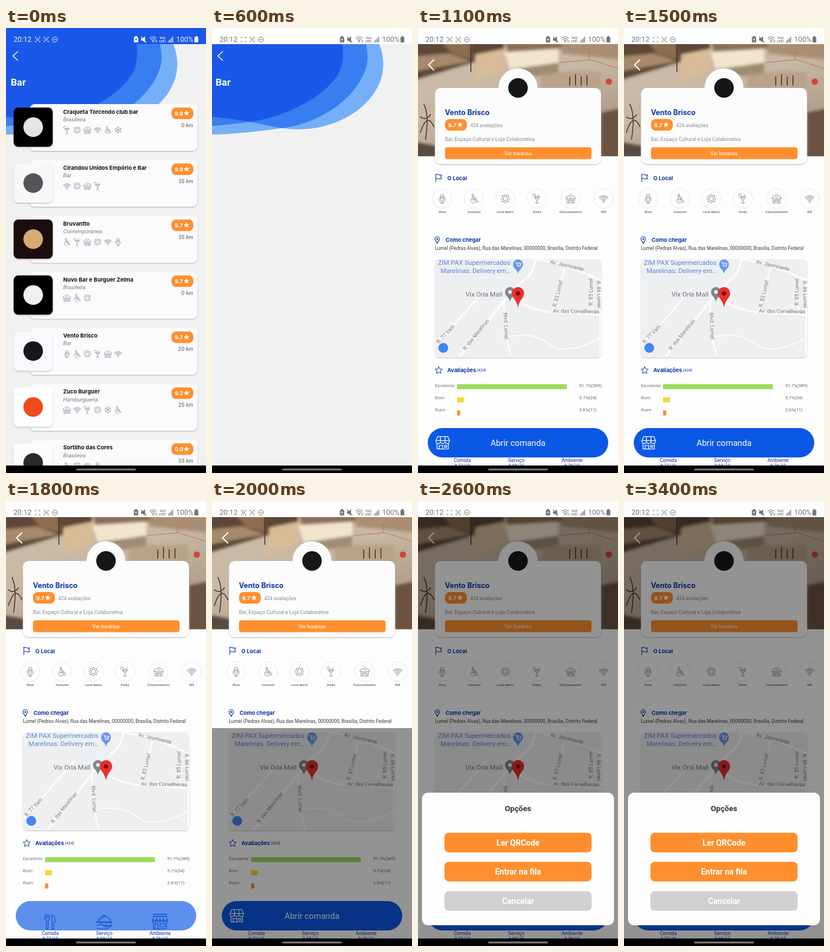
These frames come from a looping animation (348 by 772 pixels, 3500 ms). An HTML page:

```html
<!DOCTYPE html>
<html lang="pt">
<head>
<meta charset="utf-8">
<title>Bar</title>
<style>
html, body { margin: 0; width: 100%; height: 100%; overflow: hidden; background: #000; }
svg { display: block; width: 100vw; height: 100vh; }
text { font-family: Roboto, sans-serif; white-space: pre; }
.in { font-family: Inter, sans-serif; }
.b { font-weight: 700; }
.i { font-style: italic; }
</style>
</head>
<body>
<svg id="stage" viewBox="0 0 348 772"></svg>
<script>
const ORANGE = '#ff8f2e', BLUE = '#0b57e6', NAVY = '#0a33a8';
const LOOP = 3500, STEP = 100;

// Line icons on a 16 x 16 grid, centred on 0,0
const ICONS = {
  drink: 'M-5 -3H5L0 3ZM0 3V7M-3 7H3M1 -3L4 -7M-7 -4a2.6 2.6 0 1 1 4 1M-3 -1H3',
  sun: 'M-3.6 0a3.6 3.6 0 1 0 7.2 0a3.6 3.6 0 1 0 -7.2 0M-2 -5L0 -7.5L2 -5L5.3 -5.3L5 -2L7.5 0L5 2L5.3 5.3L2 5L0 7.5L-2 5L-5.3 5.3L-5 2L-7.5 0L-5 -2L-5.3 -5.3Z',
  house: 'M-7.5 -2L0 -7L7.5 -2V0H-7.5ZM-6 0V7H6V0M-3.5 7V2H3.5V7M-3.5 4H3.5M-2 -3H2',
  wifi: 'M-7.5 -2Q0 -8 7.5 -2L6 -.5Q0 -5.5 -6 -.5ZM-4.5 1Q0 -3 4.5 1L3 2.5Q0 0 -3 2.5ZM-1.3 4.5a1.3 1.3 0 1 0 2.6 0a1.3 1.3 0 1 0 -2.6 0',
  chair: 'M-3.5 -6a1.5 1.5 0 1 0 3 0a1.5 1.5 0 1 0 -3 0M-3 -3.5H0V1H4L6 6L7 5.5M-3 -3.5V2H2L4 7M0 -1H4M-4 0a4 4 0 1 0 6 5',
  snow: 'M0 -7V7M-6 -3.5L6 3.5M-6 3.5L6 -3.5M-2 -6.5L0 -4.5L2 -6.5M-2 6.5L0 4.5L2 6.5M-6.5 -1L-4 -2.3L-4.3 -5M6.5 -1L4 -2.3L4.3 -5M-6.5 1L-4 2.3L-4.3 5M6.5 1L4 2.3L4.3 5',
  mic: 'M-3 -4a3 3 0 0 1 6 0V0a3 3 0 0 1 -6 0ZM-3 -3H3M-3 -1H3M-5 -1V1a5 5 0 0 0 10 0V-1M0 6V7.5M-3 7.5H3',
  stall: 'M-5.5 -7H5.5L7.5 -2.5H-7.5ZM-7.5 -2.5V-1.5a2.5 2.3 0 0 0 5 0a2.5 2.3 0 0 0 5 0a2.5 2.3 0 0 0 5 0V-2.5M-2.5 -7V-1.5M2.5 -7V-1.5M-6.3 1V7H6.3V1M-4 7V3H0V7M2 3H4.5V5H2Z',
  shop: 'M-6.5 -7.5H6.5V-5.5H-6.5ZM-6 -5.5H6L7.5 -1.5H-7.5ZM-7.5 -1.5V0H7.5V-1.5M-3 -5.5L-3.7 0M0 -5.5V0M3 -5.5L3.7 0M-6.5 0V7H6.5V0M-5 7V2H-2V7M0 2H5V5H0Z',
  cutlery: 'M-5.2 -7.5V-3.5Q-5.2 -1.5 -3.8 -1V7.2H-2.2V-1Q-.8 -1.5 -.8 -3.5V-7.5M-3.7 -7.5V-3.5M-2.3 -7.5V-3.5M1.8 7.2V-7Q5 -6 5 0H3.6V7.2Z',
  cloche: 'M-7.5 0H7.5V1H-7.5ZM-6 0a6 5.5 0 0 1 12 0M-1 -5.5a1 1 0 1 1 2 0M-4 -1a4 3.5 0 0 1 3 -3M-7.5 4L-4 2.5L0 3.5H3L2 5H-1M2 5L6.5 3L7.5 4L2 7H-3L-7.5 6.5'
};

const fmt = o => Object.entries(o || {}).map(([k, v]) => ` ${k}="${v}"`).join('');
const rect = (x, y, w, h, fill, rx = 0, o) =>
  `<rect x="${x}" y="${y}" width="${w}" height="${h}" rx="${rx}" fill="${fill}"${fmt(o)}/>`;
const circle = (x, y, r, fill, o) => `<circle cx="${x}" cy="${y}" r="${r}" fill="${fill}"${fmt(o)}/>`;
const shape = (d, fill, o) => `<path d="${d}" fill="${fill}"${fmt(o)}/>`;
const line = (d, color, w = 1, o) =>
  shape(d, 'none', { stroke: color, 'stroke-width': w, 'stroke-linejoin': 'round', ...o });
const text = (s, x, y, size, fill, cls = '', anchor = 'start', o) =>
  `<text x="${x}" y="${y}" font-size="${size}" fill="${fill}" class="${cls}" text-anchor="${anchor}"${fmt(o)}>${s}</text>`;
const icon = (name, x, y, size, color, w = .7) =>
  line(ICONS[name], color, w * 16 / size, { transform: `translate(${x} ${y}) scale(${size / 16})` });
const group = (body, o) => `<g${fmt(o)}>${body}</g>`;

function starPath(x, y, r) {
  const pts = Array.from({ length: 10 }, (_, k) => {
    const a = (k / 5 - .5) * Math.PI, q = k % 2 ? r * .48 : r;
    return (x + q * Math.cos(a)).toFixed(2) + ' ' + (y + q * Math.sin(a)).toFixed(2);
  });
  return 'M' + pts.join('L') + 'Z';
}

const badge = (x, y, value) => rect(x, y, 38, 20, ORANGE, 8) +
  text(value, x + 5.5, y + 13.6, 9.4, '#fff', 'in b') + shape(starPath(x + 26, y + 9.8, 5), '#fff');

const backArrow = x => line(`M${x + 9} 40.5L${x} 48.5L${x + 9} 56.5`, '#fff', 1.6);

function statusBar() {
  const c = 'currentColor';
  const frame = x => line(`M${x - 4} 18V16H${x - 2}M${x + 2} 16H${x + 4}V18M${x + 4} 22V24H${x + 2}M${x - 2} 24H${x - 4}V22`, c, .9);
  let s = text('20:12', 13, 24, 12.6, c) + frame(55) + frame(70) +
    circle(55, 20, 1.9, 'none', { id: 'blink', stroke: c }) +
    circle(70, 20, 1.9, 'none', { stroke: c }) +
    circle(85, 20, 4.3, 'none', { stroke: c }) + line('M82.5 20H87.5', c);
  s += rect(222.5, 15.5, 7.5, 9.5, c, 1.5) + rect(224.5, 14, 3.5, 2, c) +
    line('M224.5 19.5H228M226.2 18V22.5', 'var(--bar)', .9);
  s += shape('M235 18H237.5L242 14.5V25L237.5 22H235Z', c) + line('M235 15L244 25', c, 1.2);
  s += line('M250 17.5Q256 12.5 262 17.5M252 20Q256 16.5 260 20M254 22.3Q256 20.6 258 22.3', c, 1.2) +
    circle(256, 24, 1, c) + line('M260.5 21V25M262.5 25V21', c, .8);
  s += text('Vo))', 267.5, 18.8, 5.4, c, 'b') + text('LTE1', 266.5, 24.6, 5.4, c, 'b');
  for (let k = 0; k < 4; k++) s += rect(282 + k * 2.4, 22.5 - k * 2.4, 1.4, 2.5 + k * 2.4, c);
  return s + text('100%', 296, 24, 12.4, c) + rect(328, 15.5, 6.5, 9.5, c, 1.2) + rect(329.8, 14, 3, 2, c);
}

const BLOB_A = 'M0 28H291Q301 52 297 76C288 132 220 180 140 175.5Q125 174.5 110 172Q55 159 0 154Z';
const BLOB_B = 'M0 28H268Q273 50 269 66C254 120 190 166 120 174Q60 183 0 185Z';
const BLOB_C = 'M0 28H227Q230 52 225 67C212 112 130 156 63 163Q30 168 0 170Z';

function backdrop() {
  const inA = { 'clip-path': 'url(#inA)' };
  return rect(0, 28, 348, 732, '#f1f1f1') + shape(BLOB_A, '#74aff8') + shape(BLOB_B, '#74aff8') +
    shape(BLOB_B, '#387ef0', inA) + shape(BLOB_C, '#387ef0') + shape(BLOB_C, '#1a58e9', inA);
}

// name, kind, rating, km, icons, tile colour, mark colour
const PLACES = [
  ['Craqueta Torcendo club bar', 'Brasileira', '9.8', 0, 'drink sun house wifi chair snow', '#050505', '#e4e4e4'],
  ['Cirandou Unidos Empório e Bar', 'Bar', '9.8', 35, 'wifi sun house drink', '#f8f8f8', '#55555a'],
  ['Bruvantto', 'Contemporânea', '9.7', 35, 'chair drink house sun wifi mic', '#1d0f08', '#d7aa72'],
  ['Nuvo Bar e Burguer Zelma', 'Brasileira', '9.7', 0, 'house chair sun', '#050505', '#f0f0f0'],
  ['Vento Brisco', 'Bar', '9.7', 20, 'mic chair sun drink house wifi', '#f8f9fc', '#17171a'],
  ['Zuco Burguer', 'Hamburgueria', '9.2', 25, 'house wifi drink sun snow chair', '#ffffff', '#ee4a1c'],
  ['Sortilho das Cores', 'Brasileira', '0.0', 33, 'chair sun wifi mic', '#fcfcfc', '#2a2a2a']
];

const placeCard = ([name, kind, rating, km, icons, tile, mark], n) => group(
  rect(41, 132, 292, 81, '#fbfafd', 9, { filter: 'url(#soft)' }) +
  rect(13.3, 138, 68, 68, tile, 8, { filter: 'url(#soft)' }) + circle(47.3, 172, 17, mark) +
  text(name, 99.5, 148.8, 9.6, '#111', 'in b') + text(kind, 99.5, 162, 9.8, '#7c7c80', 'i') +
  icons.split(' ').map((k, j) => icon(k, 106 + j * 17.8, 177, 13.5, '#85858a')).join('') +
  badge(288, 138, rating) + text(km + ' km', 326, 171.5, 9, '#55555a', 'in', 'end'),
  { transform: `translate(0 ${n * 97.1})` });

function photo() {
  const blurred = rect(-10, 18, 368, 214, 'url(#wall)') +
    shape('M-10 18H150V66L96 60L-10 92Z', '#5d4737') + shape('M36 18H92V54L60 46Z', '#8d6c50') +
    shape('M-10 50L52 44L92 58L-10 76Z', '#a78a6c') + shape('M100 46L150 36V74L96 92Z', '#d8bc98') +
    shape('M150 18H250V36L156 42Z', '#8c7057') + shape('M150 42L244 36V60L160 72Z', '#f2e4cf') +
    shape('M160 72L244 60V78L206 84Z', '#a08b75') + shape('M250 18H358V56L250 44Z', '#a98e73') +
    shape('M250 76H318V104H214V84Z', '#b9a288') + shape('M318 146L358 138V232H318Z', '#6b5240') +
    shape('M-10 196L32 204V232H-10Z', '#574b40');
  return group(blurred, { filter: 'url(#blur)' }) +
    line('M92 28V76', '#44352a', 1.6) + line('M246 60L300 55L348 70M298 55V40', '#c06a52', .9) +
    line('M264 84V100M274 80V100M284 84V100M294 82V100', '#5d4a3b', 2) +
    line('M4 182Q16 144 28 172M10 132Q20 150 13 194M4 154Q14 162 22 150', '#4a4038', 1.7) +
    circle(332, 93, 5.5, '#d9433a');
}

function mapView() {
  const road = (d, w) => line(d, '#fcfcfd', w);
  const street = (s, x, y, a, size = 9) =>
    text(s, x, y, size, '#74787c', '', 'middle', { transform: `rotate(${a} ${x} ${y})`, dy: 3 });
  const pin = (x, y, r, tip, c) =>
    shape(`M${x - r} ${y}a${r} ${r} 0 0 1 ${2 * r} 0C${x + r} ${y + r * .85} ${x + r * .2} ${y + r} ${x} ${tip}C${x - r * .2} ${y + r} ${x - r} ${y + r * .85} ${x - r} ${y}Z`, c);
  let s = rect(29, 401, 290, 170, '#eeeff1') +
    road('M72 571L150 473Q166 452 184 438T204 401', 4) + road('M29 552L76 500L118 452', 3) +
    road('M150 474Q148 522 162 571', 3) + road('M174 474Q206 492 236 493T318 498', 3.5) +
    road('M204 401Q260 410 318 438', 3) + road('M256 412Q247 450 235 491', 3) +
    road('M303 430V496M317 436V571', 2.5) + road('M156 536Q200 526 228 548T318 538', 2);
  s += street('Av. Jasmirante', 259, 412, 13) + street('R. 83 Lumel', 243, 461, -76) +
    street('R. 85 Lumel', 301, 458, -90) + street('R. 86 Lumel', 315, 462, 88) +
    street('Av. das Corvelheiras', 275, 491.5, 1) + street('Blvd. Lumel', 153, 517, 87) +
    street('R. das Marelinas', 101, 532, -51) + street('R. 77 Vam', 48, 531, -47);
  s += text('ZIM PAX Supermercados', 161, 411, 11.4, '#5b84dc', '', 'end') +
    text('Marelinas: Delivery em…', 161, 424.5, 11.4, '#5b84dc', '', 'end') +
    text('Vix Orla Mall', 147, 466, 11.5, '#6d7378', '', 'end');
  s += pin(174, 410, 8.5, 426, '#6896ea') +
    line('M169.5 406.5H171.5L173 412H178L179 408H172', '#fff', 1.2) + circle(173.5, 414, .9, '#fff') + circle(177.5, 414, .9, '#fff');
  s += pin(160, 458, 8.5, 475, '#7b8890') + circle(160, 458, 3.2, '#eeeff1') +
    pin(174, 460, 10.6, 485.5, '#ea2f2f') + circle(174, 460.5, 3.8, '#7d1010') + circle(44, 555, 8.5, '#4285f4');
  return rect(29.5, 402, 289, 169, '#fff', 7, { filter: 'url(#soft)' }) + group(s, { 'clip-path': 'url(#mapBox)' });
}

function detail() {
  const head = (s, x, y) => text(s, x, y, 9.4, NAVY, 'in b');
  let s = rect(0, 28, 348, 732, '#fdfdfd') + group(photo(), { 'clip-path': 'url(#hero)' }) +
    line('M28 54.5L18.5 64L28 73.5', '#fff', 2) +
    rect(29.5, 104, 289, 132, '#fcfcfd', 10, { filter: 'url(#soft)' }) +
    circle(174, 104, 34, '#fcfcfd') + circle(174, 104, 17, '#17171a') +
    text('Vento Brisco', 46.8, 150.6, 12.5, NAVY, 'in b') + badge(47, 158, '9.7') +
    text('424 avaliações', 91, 171.6, 8.4, '#8b8b8f') +
    text('Bar, Espaço Cultural e Loja Colaborativa', 46.8, 196.2, 8.9, '#8b8b8f') +
    rect(47, 207, 255, 20.5, ORANGE, 4) + text('Ver horários', 174, 220.5, 8.8, '#fff', '', 'middle');
  s += line('M31 253V267M31 254.5Q34 253 36 254.5T41 254.5L39.5 258L41 261.5Q38 262.5 36 261.5T31 261.5', NAVY, 1.1) +
    head('O Local', 51, 263.6);
  [[42, 'mic', 'Show'], [97.5, 'chair', 'Acessível'], [152, 'sun', 'Local aberto'], [207, 'drink', 'Drinks'],
   [265.5, 'house', 'Estacionamento'], [323, 'wifi', 'Wifi']].forEach(([x, k, label]) => {
    s += circle(x, 296, 16.8, '#fdfdfd', { stroke: '#e3e3e6', 'stroke-width': .8 }) +
      icon(k, x, 296, 17, '#77777c', .8) + text(label, x, 321.4, 5.3, '#444', '', 'middle');
  });
  s += line('M29.5 366a4 4 0 0 1 8 0C37.5 369 34 371 33.5 374C33 371 29.5 369 29.5 366Z', NAVY, 1.2) +
    circle(33.5, 366, 1.6, NAVY) + head('Como chegar', 48, 370.8) +
    text('Lumel (Pedras Alvas), Rua das Marelinas, 00000000, Brasília, Distrito Federal', 29.5, 385.4, 8.35, '#3c3c40') + mapView();
  s += line(starPath(36, 594, 6.5), NAVY, 1) + head('Avaliações', 51, 596.8) + text('(424)', 102.5, 596, 6.8, NAVY);
  [['Excelente', '91.7%(389)', 191, '#9bdb58'], ['Bom', '5.7%(24)', 12, '#f4d73c'], ['Ruim', '2.6%(11)', 5.5, '#fb8f30']]
    .forEach(([label, share, w, c], n) => {
      const y = 618 + n * 22.8;
      s += text(label, 29.5, 623 + n * 21, 8, '#77777b') + rect(68, y, w, 8.6, c, .8) +
        text(share, 280.5, 623 + n * 21, 7.7, '#66666a');
    });
  [[77, 'cutlery', 'Comida', '9.72/10'], [171, 'cloche', 'Serviço', '9.69/10'], [268, 'shop', 'Ambiente', '9.76/10']]
    .forEach(([x, k, label, score]) => {
      s += icon(k, x, 730, 28, NAVY, 1.1) + text(label, x, 753, 8.6, NAVY, '', 'middle') +
        text(score, x, 761.4, 7.8, NAVY, '', 'middle');
    });
  return s + rect(17, 694, 314, 51, BLUE, 25.5, { id: 'cta' }) +
    group(icon('stall', 43, 719.5, 25, '#fff', 1.3) + text('Abrir comanda', 174, 724.6, 14.6, '#fff', '', 'middle'), { id: 'ctaLabel' });
}

function sheet() {
  const button = (s, y, c) => rect(46, y, 256, 34, c, 7.5) + text(s, 174, y + 22.4, 14, '#fff', 'b', 'middle');
  return rect(0, 28, 348, 732, '#000', 0, { opacity: .42 }) + rect(7, 506, 334, 230, '#fdfdfd', 10) +
    text('Opções', 174, 538, 13.6, '#333', 'b', 'middle') + button('Ler QRCode', 575.5, ORANGE) +
    button('Entrar na fila', 626, ORANGE) + button('Cancelar', 677, '#d0d0d2');
}

const clip = (id, body) => `<clipPath id="${id}">${body}</clipPath>`;
document.getElementById('stage').innerHTML = '<defs>' +
  clip('inA', shape(BLOB_A, '#000')) + clip('hero', rect(0, 28, 348, 194.5, '#000')) +
  clip('mapBox', rect(29.5, 401, 289, 169, '#000', 7)) + clip('body', rect(0, 28, 348, 731, '#000')) +
  '<linearGradient id="wall" x2=".6" y2="1"><stop stop-color="#cdbda9"/><stop offset=".5" stop-color="#c8b7a2"/><stop offset="1" stop-color="#a8967f"/></linearGradient>' +
  '<filter id="blur"><feGaussianBlur stdDeviation="2.5"/></filter>' +
  '<filter id="soft" x="-10%" y="-10%" width="120%" height="125%"><feDropShadow dx="0" dy="1.2" stdDeviation="1.1" flood-opacity=".26"/></filter></defs>' +
  rect(0, 0, 348, 772, '#000') + rect(0, 0, 348, 28.5, '#fff', 0, { id: 'bar' }) +
  group(
    backdrop() +
    group(backArrow(12) + text('Bar', 8.2, 100, 17, '#fff', 'b'), { id: 'head' }) +
    group(PLACES.map(placeCard).join(''), { id: 'list' }) +
    group(detail(), { id: 'detail' }) + group(sheet(), { id: 'sheet' }),
    { 'clip-path': 'url(#body)' }) +
  group(statusBar(), { id: 'status' }) + rect(122, 764.3, 104, 3.2, '#77777a', 1.6);

const el = Object.fromEntries(['bar', 'head', 'list', 'detail', 'sheet', 'status', 'blink', 'cta', 'ctaLabel']
  .map(id => [id, document.getElementById(id)]));
const show = (e, on) => e.setAttribute('visibility', on ? 'visible' : 'hidden');
const move = (e, x, y) => e.setAttribute('transform', `translate(${x} ${y})`);
const ease = (t, start, length) => {
  const u = Math.min(1, Math.max(0, (t - start) / length));
  return u < .5 ? 4 * u ** 3 : 1 - 4 * (1 - u) ** 3;
};

function draw(ms) {
  const t = Math.floor((ms % LOOP) / STEP) * STEP;
  const left = t >= 600;
  const push = left ? ease(t, 533, 400) : 0;
  const rise = ease(t, 1850, 300);
  const barColor = left ? '#fdfdfd' : '#1a58e9';

  el.bar.setAttribute('fill', barColor);
  el.status.setAttribute('style', `color:${left ? '#757578' : '#eef3ff'};--bar:${barColor}`);
  show(el.blink, t < 400 || (t >= 900 && t < 1400) || (t >= 1900 && t < 2400));
  show(el.list, !left);
  move(el.head, -104 * push, 0);
  show(el.detail, t >= 700);
  move(el.detail, 348 * (1 - push), 0);

  el.cta.setAttribute('opacity', t === 1800 ? .66 : t === 1900 ? .92 : 1);
  el.ctaLabel.setAttribute('opacity', t === 1800 ? 0 : 1);
  show(el.sheet, rise > 0);
  move(el.sheet, 0, 732 * (1 - rise));
}

const begin = performance.now();
function tick() {
  draw(performance.now() - begin);
  requestAnimationFrame(tick);
}
tick();
</script>
</body>
</html>
```
